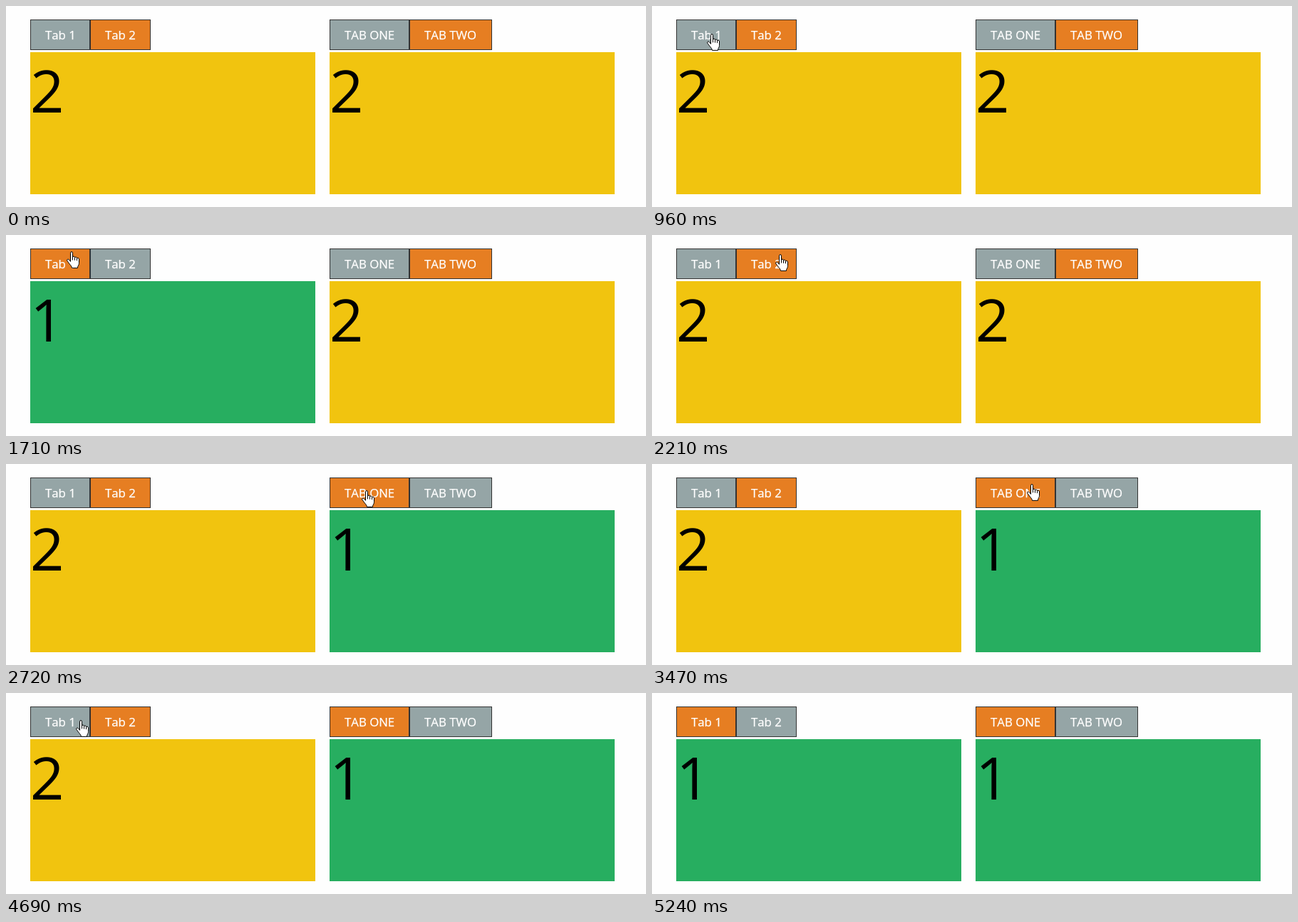
An HTML page for the animation above (6.11 s loop, 898 by 283 pixels).

```html
<!DOCTYPE html>
<html lang="en">
<head>
<meta charset="utf-8">
<title>Tabs</title>
<style>
  html, body { margin: 0; width: 100%; height: 100%; overflow: hidden; background: #fefefe; }
  svg { display: block; width: 898px; height: 283px; font-family: "Open Sans", "Noto Sans", sans-serif; }
  .tab rect { stroke: #333; fill: #95a5a6; }
  .tab.on rect { fill: #e67e22; }
  .tab text { fill: #fff; stroke: #fff; stroke-width: 0.25px; font-size: 16.8px; font-kerning: none; }
  .digit { font-size: 83px; }
</style>
</head>
<body>
<svg viewBox="0 0 898 283">
  <g id="widgets"></g>
  <g id="hand" stroke="#000" stroke-linejoin="round" stroke-linecap="round">
    <path fill="#fff" d="M5.5 14V2.3Q5.5 .6 7 .6T8.5 2.3V8Q8.7 7 10 7.1T11.5 8.7Q11.9 7.8 13 8T14.5 9.7Q14.9 9 16 9.2T17.5 11V16.5Q17.5 18.6 16.4 20.2T15.5 23.4H7.5Q7.2 21.3 5.6 19.5T2.7 15.8L.8 13.2Q.2 11.8 1.3 11.3T3.5 11.8Z"/>
    <path fill="none" d="M8.5 8V12M11.5 9V12.3M14.5 10V12.8"/>
  </g>
</svg>
<script>
const LOOP = 6110, SHOW = 520, HIDE = 5240;
const STEP = 60, REST = 150; // pointer refresh, pause before a click
const NS = "http://www.w3.org/2000/svg";
const root = document.getElementById("widgets");
const hand = document.getElementById("hand");

// The pointer's tour: when it sets off, when it clicks, and where.
const entry = { x: 165, y: 290 };
const stops = [
  [520, 1080, 77, 39],
  [1140, 1530, 181, 31],
  [1590, 1710, 85, 23],
  [1880, 2150, 156, 27],
  [2210, 2720, 499, 37],
  [2780, 3020, 592, 37],
  [3080, 3380, 526, 28],
  [3540, 3970, 610, 37],
  [4090, 4320, 516, 37],
  [4380, 4900, 76, 38],
  [4960, 5330, 471, 227]
].map(([leave, click, x, y]) => ({ leave, click, x, y }));

function add(parent, tag, attrs, text = "") {
  const el = document.createElementNS(NS, tag);
  for (const key in attrs) el.setAttribute(key, attrs[key]);
  el.textContent = text;
  return parent.appendChild(el);
}

function makeWidget(left, labels) {
  let x = left;
  const tabs = labels.map(([label, width]) => {
    const el = add(root, "g", { class: "tab" });
    add(el, "rect", { x: x + 0.5, y: 19.5, width: width - 1, height: 42 });
    add(el, "text", { x: x + 21, y: 47 }, label);
    x += width;
    return { el, left: x - width, right: x };
  });
  const panel = add(root, "rect", { x: left, y: 65, width: 400, height: 200 });
  const digit = add(root, "text", { x: left, y: 150, class: "digit" });
  return { tabs, panel, digit };
}

const widgets = [
  makeWidget(34, [["Tab 1", 84], ["Tab 2", 85]]),
  makeWidget(454, [["TAB ONE", 112], ["TAB TWO", 116]])
];

function isHit(tab, { x, y }) {
  const tip = x + 7;
  return y < 62 && tip >= tab.left && tip < tab.right;
}

function openTab(tabs, t) {
  let open = 1;
  for (const stop of stops) {
    if (stop.click > t) break;
    const hit = tabs.findIndex(tab => isHit(tab, stop));
    if (hit >= 0) open = hit;
  }
  return open;
}

function pointerAt(t) {
  let { x, y } = entry;
  for (const stop of stops) {
    if (t < stop.leave) break;
    const arrive = Math.max(stop.leave + STEP, stop.click - REST);
    const count = Math.floor((arrive - stop.leave) / STEP) + 1;
    const done = Math.min(count, Math.floor((t - stop.leave) / STEP) + 1);
    const p = (1 - Math.cos(Math.PI * done / count)) / 2;
    x += (stop.x - x) * p;
    y += (stop.y - y) * p;
  }
  return [Math.round(x), Math.round(y)];
}

function render(t) {
  for (const { tabs, panel, digit } of widgets) {
    const open = openTab(tabs, t);
    tabs.forEach((tab, i) => tab.el.classList.toggle("on", i === open));
    panel.setAttribute("fill", ["#27ae60", "#f1c40f"][open]);
    digit.textContent = open + 1;
  }
  hand.setAttribute("visibility", t >= SHOW && t < HIDE ? "visible" : "hidden");
  hand.setAttribute("transform", `translate(${pointerAt(t)})`);
}

const begin = performance.now();
function tick() {
  render((performance.now() - begin) % LOOP);
  requestAnimationFrame(tick);
}
tick();
</script>
</body>
</html>
```
